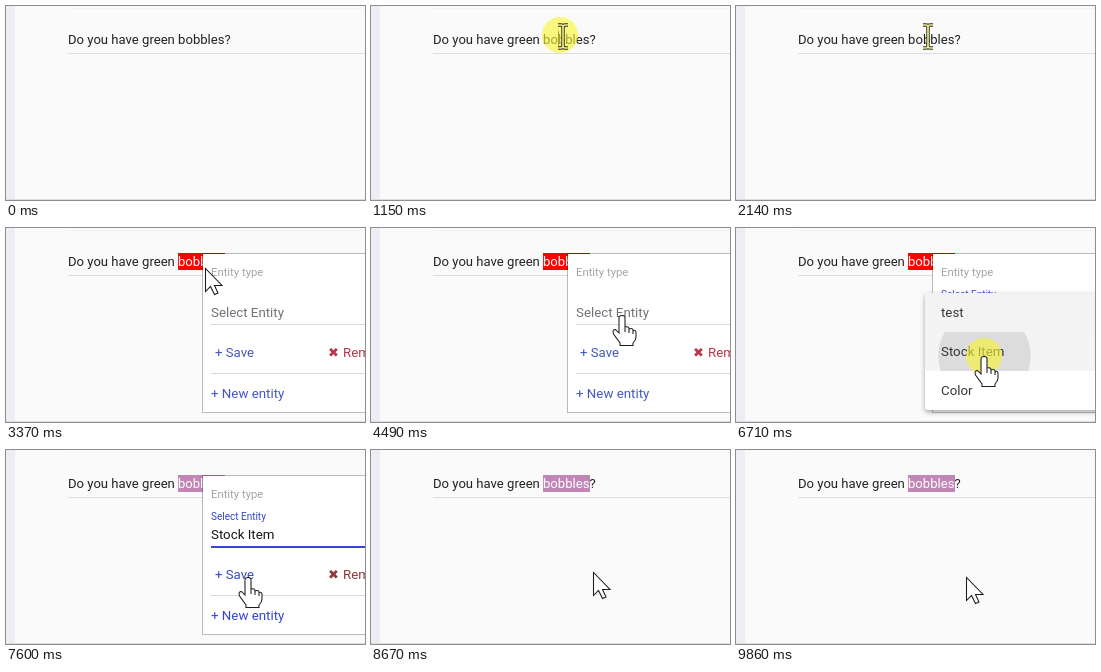
Write an HTML page with a canvas that moves like this. It is 359 px wide and 194 px high and loops after 9930 ms.

```html
<!DOCTYPE html>
<html lang="en">
<head>
<meta charset="utf-8">
<title>Entity tagging</title>
<style>
  html, body { margin: 0; width: 100%; height: 100%; overflow: hidden; background: #fafafa; }
  canvas { display: block; width: 359px; height: 194px; }
</style>
</head>
<body>
<canvas></canvas>
<script>
const LOOP = 9930, STEP = 70, W = 359, H = 194, ROW = 39;
const canvas = document.querySelector('canvas');
const dpr = window.devicePixelRatio || 1;
canvas.width = W * dpr;
canvas.height = H * dpr;
const ctx = canvas.getContext('2d');

// Moments of the story, in ms
const ENTER = 190, PLACE_CARET = 1150, SELECT_WORD = 2770, SHOW_POPUP = 2840;
const OPEN_MENU = 4820, PICK = 6510, CHOSEN = 6780, SAVE = 8270, CLOSE = 8670;

// Places the pointer visits
const point = (x, y) => ({ x, y });
const entry = point(280, 200), word = point(189, 29), field = point(251, 87);
const option = point(248, 128), saveLink = point(222, 122), rest = point(230, 127);
const moves = [
  { start: ENTER, end: 820, from: entry, to: word },
  { start: 3370, end: 4490, from: word, to: field, bend: point(277, 130) },
  { start: 5900, end: 6310, from: field, to: option },
  { start: 7600, end: 7810, from: option, to: saveLink },
  { start: 9860, end: 9860, from: saveLink, to: rest }
];

const ARROW = new Path2D('M.5 .5V23.5L5.5 18.5 9.5 26.5 13 25 9.5 17.5H17Z');
const HAND = new Path2D('M-3 3Q-3 .5 0 .5Q3 .5 3 3V12Q7 11 7 14Q11 12.5 11 15.5' +
  'Q14 14.5 14 18V22Q14 25 11 28V30.5H-2V28L-8.5 19Q-10 14.5-6.5 14.5L-3 18Z' +
  'M3 12V17M7 14V18M11 15.5V19');
const IBEAM = new Path2D('M-2 -10H1Q3 -10 3 -8Q3 -10 5 -10H8M3 -8V11M-2 13H1Q3 13 3 11Q3 13 5 13H8');

const clamp = v => Math.max(0, Math.min(1, v));
const progress = (t, start, duration) => clamp((t - start) / duration);
const during = (t, a, b) => t >= a && t < b;
const ease = p => p * p * (3 - 2 * p);
const mix = (a, b, p) => a + (b - a) * p;

function rect(x, y, w, h, color) {
  ctx.fillStyle = color;
  ctx.fillRect(x, y, w, h);
}

function text(str, x, y, color, size = 13.3, family = 'Roboto, sans-serif') {
  ctx.font = `${size}px ${family}`;
  ctx.fillStyle = color;
  ctx.fillText(str, x, y);
}

function disc(x, y, r, color) {
  ctx.fillStyle = color;
  ctx.beginPath();
  ctx.arc(x, y, r, 0, 7);
  ctx.fill();
}

// The pointer travels in even steps along a straight or bent line.
function pointerAt(t) {
  const move = moves.filter(m => m.start <= t).pop();
  const { start, end, from, to } = move;
  const bend = move.bend || point((from.x + to.x) / 2, (from.y + to.y) / 2);
  const steps = Math.round((end - start) / STEP) + 1;
  const p = clamp((Math.floor((t - start) / STEP) + 1) / steps);
  const along = axis => Math.round(
    mix(mix(from[axis], bend[axis], p), mix(bend[axis], to[axis], p), p));
  return point(along('x'), along('y'));
}

function isPressed(t) {
  return during(t, PLACE_CARET, PLACE_CARET + 130) || during(t, SELECT_WORD, SHOW_POPUP) ||
    during(t, OPEN_MENU, OPEN_MENU + 210) || during(t, PICK, CHOSEN) || during(t, SAVE, CLOSE);
}

function drawPage(t) {
  rect(0, 0, W, H, '#fafafa');
  rect(0, 0, 9, H, '#eeedf4');
  rect(62, 2, W, 1, '#f3f3f3');
  rect(62, 47, W, 1, '#dedede');
  rect(0, 193, W, 1, '#dcdce0');
  text('Do you have green bobbles?', 62, 38, '#222', 13.1);
  if (t >= SHOW_POPUP) {
    rect(172, 25, 47, 17, t < CHOSEN + STEP ? '#f00' : '#c186b5');
    text('bobbles', 172, 38, '#fff', 13.1);
  }
  if (during(t, PLACE_CARET, 1680) || during(t, 2010, 2140)) rect(187, 25, 1, 17, '#222');
}

function drawPopup(t) {
  const chosen = t >= CHOSEN;
  const blue = chosen ? '#3347d0' : '#4257c4';
  const red = chosen ? '#97353c' : '#bd3347';
  const focused = during(t, OPEN_MENU, SAVE);
  const float = ease(progress(t, OPEN_MENU + STEP, 400));

  ctx.lineWidth = 1;
  ctx.strokeStyle = 'rgba(0,0,0,.26)';
  ctx.strokeRect(196.5, 25.5, W, 159);
  rect(197, 26, W, 158, '#fff');
  text('Entity type', 205, 48, '#a5a3a8', 11.3);
  text('Select Entity', 205, mix(89, 69.5, float), focused ? blue : '#75707a', mix(13.3, 10, float));
  if (chosen) text('Stock Item', 205, 89, '#161616');
  rect(205, 96, W, focused ? 2 : 1, focused ? blue : '#dadada');
  text('+ Save', 209, 129, blue, 13.2);
  text('✖', 322, 129, red, 13, '"DejaVu Sans", sans-serif');
  text('Remove', 337, 129, red);
  rect(205, 145, W, 1, '#dadada');
  text('+ New entity', 205, 170, blue);
}

function drawMenu(t) {
  const open = progress(t, OPEN_MENU, 140);
  ctx.save();
  ctx.globalAlpha = open * (1 - progress(t, CHOSEN - 40, 140));
  ctx.translate(0, 65);
  ctx.scale(1, mix(0.8, 1, open));
  ctx.shadowColor = 'rgba(0,0,0,.35)';
  ctx.shadowBlur = 5 * dpr;
  ctx.shadowOffsetY = 2 * dpr;
  ctx.fillStyle = '#fff';
  ctx.beginPath();
  ctx.roundRect(189, 0, 200, 3 * ROW, 3);
  ctx.fill();
  ctx.shadowColor = 'transparent';
  ctx.clip();
  rect(189, 0, W, ROW, '#f3f3f3');
  if (pointerAt(t).y > 65 + ROW) rect(189, ROW, W, ROW, '#f4f4f4');
  if (t >= PICK) {
    ctx.save();
    ctx.beginPath();
    ctx.rect(189, ROW, W, ROW);
    ctx.clip();
    disc(option.x + 0.5, option.y - 65, 0.23 * (t - PICK), '#dcdcdc');
    ctx.restore();
  }
  ['test', 'Stock Item', 'Color'].forEach((name, i) => text(name, 205, 24 + ROW * i, '#363636'));
  ctx.restore();
}

function drawPointer(t) {
  const { x, y } = pointerAt(t);
  if (isPressed(t)) disc(x, y, 18, 'rgba(250,246,50,.62)');
  ctx.save();
  ctx.translate(x, y);
  if (t < SHOW_POPUP && y < 46) {
    ctx.lineWidth = 3.4;
    ctx.strokeStyle = '#33321c';
    ctx.stroke(IBEAM);
    ctx.lineWidth = 1.6;
    ctx.strokeStyle = '#f2ee9a';
    ctx.stroke(IBEAM);
  } else {
    const shape = during(t, 4280, CLOSE) ? HAND : ARROW;
    ctx.fillStyle = '#fff';
    ctx.fill(shape);
    ctx.lineWidth = 1.05;
    ctx.strokeStyle = '#1a1a1a';
    ctx.stroke(shape);
  }
  ctx.restore();
}

function draw(t) {
  ctx.setTransform(dpr, 0, 0, dpr, 0, 0);
  drawPage(t);
  if (during(t, SHOW_POPUP, CLOSE)) drawPopup(t);
  if (during(t, OPEN_MENU, CHOSEN + 100)) drawMenu(t);
  if (t >= ENTER) drawPointer(t);
}

const start = performance.now();
function tick() {
  draw((performance.now() - start) % LOOP);
  requestAnimationFrame(tick);
}
tick();
</script>
</body>
</html>
```
